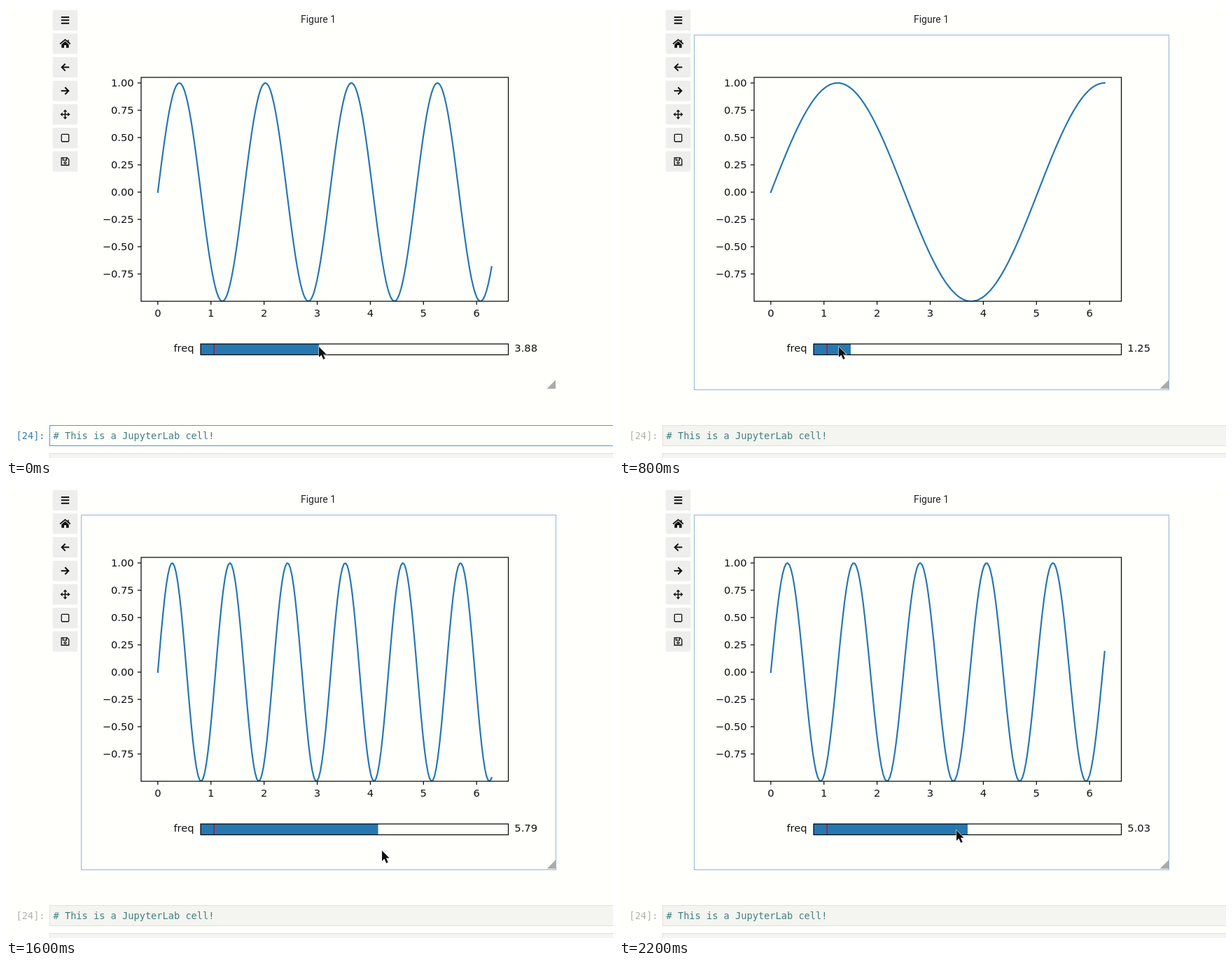
These frames come from a looping animation (867x646 px, 2.3 s). An HTML page:

```html
<!DOCTYPE html>
<html lang="en">
<head>
<meta charset="utf-8">
<title>Interactive sine plot</title>
<style>
  html, body { margin: 0; width: 100%; height: 100%; overflow: hidden; background: #fffffc; }
  svg { display: block; }
  .plot { font: 14.69px "DejaVu Sans", sans-serif; fill: #111; }
  .mono { font: 13.65px "DejaVu Sans Mono", monospace; white-space: pre; }
  .title { font: 14px Roboto, sans-serif; fill: #222; }
  .spine { fill: none; stroke: #000; stroke-width: 1.2; }
  .icon { fill: none; stroke: #111; stroke-width: 2; }
  .end { text-anchor: end; }
  .mid { text-anchor: middle; }
</style>
</head>
<body>
<svg id="stage" width="867" height="646" viewBox="0 0 867 646">
  <defs><clipPath id="axes"><rect x="193" y="102" width="524.5" height="320"/></clipPath></defs>
  <g id="toolbar"></g>
  <text class="title mid" x="446" y="24">Figure 1</text>
  <path d="M785 534.5V547H772.5Z" fill="#aaa"/>
  <rect id="focus" x="107.5" y="41.5" width="678" height="507" fill="none" stroke="#8fb6d8"/>

  <path id="curve" clip-path="url(#axes)" fill="none" stroke="#2678b0" stroke-width="2.2" stroke-linejoin="round" stroke-linecap="square"/>
  <rect class="spine" x="193" y="102" width="524.5" height="320"/>
  <g id="ticks" class="plot"></g>

  <text class="plot end" x="268.7" y="494">freq</text>
  <rect id="bar" x="278" y="483" height="15.5" fill="#2678b0"/>
  <path d="M297.2 483V498.5" stroke="#b01535" stroke-width="1.5"/>
  <rect class="spine" x="278" y="483" width="439.5" height="15.5"/>
  <text id="value" class="plot" x="726.3" y="494"></text>

  <text id="prompt" class="mono" x="14.5" y="619">[24]:</text>
  <rect id="cell" x="62.5" y="599.5" width="820" height="29"/>
  <text class="mono" x="67.5" y="619" fill="#408080" font-style="italic"># This is a JupyterLab cell!</text>
  <rect x="62.5" y="639.5" width="820" height="20" fill="#f4f4f1" stroke="#e0e0de"/>

  <path id="cursor" d="M0 0V15L3.4 11.8L6.2 18L8.8 16.8L6 10.8H10.6Z" fill="#111" stroke="#fff" stroke-width="1.1" paint-order="stroke"/>
</svg>
<script>
const byId = id => document.getElementById(id);
const set = (id, attrs) => {
  for (const key in attrs) byId(id).setAttribute(key, attrs[key]);
};

// Icons are drawn around their own centre.
const icons = [
  '<path d="M-5.7-4.4H5.7M-5.7 0H5.7M-5.7 4.4H5.7"/>',
  '<path d="M-7.3 .3L0-5.8L7.3 .3" stroke-width="1.7"/><path d="M0-3.4L5.2 1V5.8H1.5V2H-1.5V5.8H-5.2V1ZM3.5-5.5H5.2V-1L3.5-2.5Z" fill="#111" stroke="none"/>',
  '<path d="M.2-5L-4.8 0L.2 5M-4.5 0H5.8"/>',
  '<path d="M-.2-5L4.8 0L-.2 5M4.5 0H-5.8"/>',
  '<path d="M-5 0H5M0-5V5" stroke-width="1.5"/><path d="M0-7L2.8-3.8H-2.8ZM0 7L2.8 3.8H-2.8ZM-7 0L-3.8-2.8V2.8ZM7 0L3.8-2.8V2.8Z" fill="#111" stroke="none"/>',
  '<rect x="-5.2" y="-5.2" width="10.4" height="10.4" rx="1" stroke-width="1.3"/>',
  '<path d="M-5.3-5.3H2.8L5.3-2.8V5.3H-5.3ZM-3-5V-1.8H2V-5" stroke-width="1.3"/><circle cy="1.9" r="1.5" stroke-width="1.3"/>'
];
byId('toolbar').innerHTML = icons.map((icon, i) => {
  const y = 20.3 + 33.65 * i;
  return `<g transform="translate(84.5 ${y})"><rect x="-17.8" y="-14.6" width="35.6" height="29.2" rx="1" fill="#eeeeec"/><g class="icon">${icon}</g></g>`;
}).join('');

const plotX = x => 216.84 + 75.89 * x;
const plotY = y => 266 - 156 * y;
const sliderX = freq => 278 + (freq - 0.05) * 44.17;

let ticks = '';
for (let x = 0; x <= 6; x++) {
  ticks += `<path class="spine" d="M${plotX(x)} 422v5.1"/><text class="mid" x="${plotX(x)}" y="444">${x}</text>`;
}
for (let y = -0.75; y <= 1; y += 0.25) {
  const label = y.toFixed(2).replace('-', '\u2212');
  ticks += `<path class="spine" d="M193 ${plotY(y)}h-5.1"/><text class="end" x="182.7" y="${plotY(y) + 5.2}">${label}</text>`;
}
byId('ticks').innerHTML = ticks;

function sinePath(freq) {
  const points = Array.from({ length: 200 }, (_, i) => {
    const x = 2 * Math.PI * i / 199;
    return `${plotX(x).toFixed(2)} ${plotY(Math.sin(freq * x)).toFixed(2)}`;
  });
  return 'M' + points.join('L');
}

// The slider trails the pointer by one tick, so the pointer uses the next frequency.
const LOOP = 2300, TICK = 100, HOLD = 200;
const freqs = [3.88, 3.88, 3.54, 3.11, 2.65, 1.95, 1.25, 0.87, 0.64, 0.68, 1.10,
  2.90, 4.06, 5.01, 5.79, 5.91, 7.16, 7.23, 6.84, 5.89, 5.03, 4.67];
const pointerY = [487, 490, 492, 493, 491, 489, 487, 488, 491, 498, 506,
  509, 510, 517, 521, 515, 508, 501, 496, 494, 492];

function draw(time) {
  const step = Math.max(0, Math.floor((time % LOOP - HOLD) / TICK));
  const freq = freqs[step];
  const cellActive = step === 0;
  set('curve', { d: sinePath(freq) });
  set('bar', { width: sliderX(freq) - 278 });
  byId('value').textContent = freq.toFixed(2);
  set('cursor', { transform: `translate(${Math.round(sliderX(freqs[step + 1]))} ${pointerY[step]})` });
  set('focus', { visibility: cellActive ? 'hidden' : 'visible' });
  set('prompt', { fill: cellActive ? '#307fb5' : '#b0b0ae' });
  set('cell', cellActive
    ? { fill: '#fffffc', stroke: '#4f9bc8' }
    : { fill: '#f4f4f1', stroke: '#e0e0de' });
}

const start = performance.now();
function loop() {
  draw(performance.now() - start);
  requestAnimationFrame(loop);
}
loop();
</script>
</body>
</html>
```
